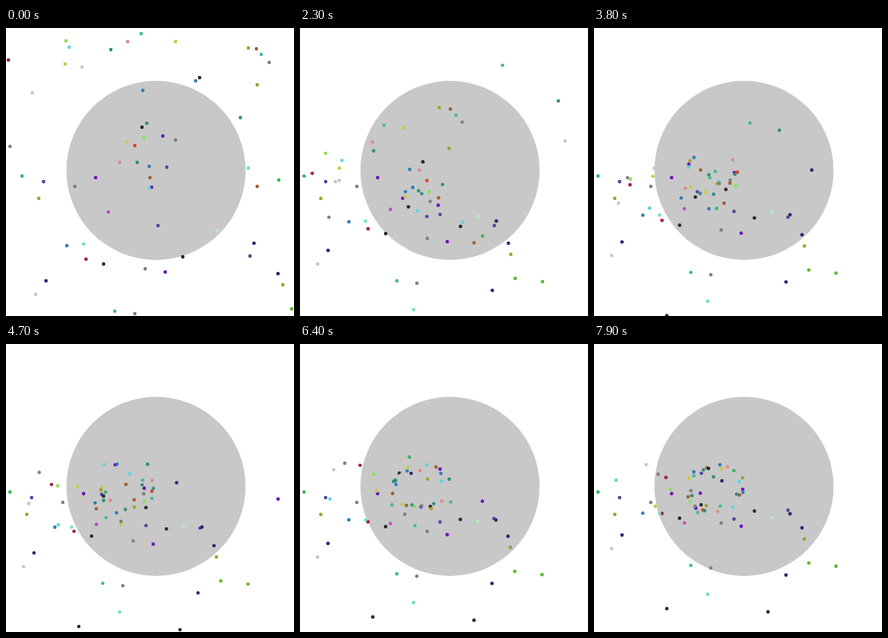
Write an HTML page that moves like this. It is 360x360 px and loops after 8000 ms.

```html
<!DOCTYPE html>
<html lang="en">
<head>
<meta charset="utf-8">
<title>Drifting dots</title>
<style>
  html, body { margin: 0; width: 100%; height: 100%; overflow: hidden; background: #fff; }
  svg { display: block; width: 100%; height: 100%; }
</style>
</head>
<body>
<svg id="stage" viewBox="0 0 360 360">
  <circle cx="187.5" cy="178" r="112" fill="#c8c8c8"/>
</svg>
<script>
const LOOP = 8000, TICK = 100, SPEED = 66;
const CENTER = { x: 150, y: 182 };

// Starting places by colour; dots beyond the stage drift in later.
const groups = {
  '#a91f3a': [[100, 289], [3, 40]],
  '#d2452f': [[161, 147]],
  '#a05f35': [[313, 26], [314, 198], [180, 187]],
  '#d98f88': [[152, 17], [142, 168]],
  '#c34bc4': [[128, 230]],
  '#6a16b8': [[196, 135], [182, 199], [112, 187], [199, 305], [650, 180]],
  '#4c46a8': [[47, 192], [190, 247], [201, 174], [305, 285]],
  '#2c2470': [[310, 269], [340, 307], [50, 316], [300, 366], [520, 150]],
  '#2a2530': [[242, 62], [170, 124], [122, 295], [221, 286], [106, 408], [255, 412]],
  '#2f7fb5': [[171, 78], [179, 173], [76, 272], [237, 66]],
  '#5fd5dc': [[303, 175], [79, 24], [179, 200]],
  '#2f8f80': [[176, 119], [164, 168], [131, 27], [293, 112], [470, 60]],
  '#45bd92': [[169, 7], [319, 33], [136, 354], [390, 0]],
  '#74e2bd': [[97, 270], [157, 390]],
  '#38b85c': [[20, 185], [341, 190]],
  '#62b52f': [[425, 355], [357, 351]],
  '#8fdf55': [[75, 16], [172, 137]],
  '#c9c944': [[151, 142], [74, 45], [212, 17]],
  '#a3a032': [[303, 25], [314, 71], [346, 321], [41, 213]],
  '#808080': [[329, 43], [5, 148], [86, 198], [174, 301], [161, 357], [212, 140]],
  '#c5c8c5': [[95, 49], [33, 81], [37, 333], [480, 110]],
  '#bce8b8': [[264, 253]]
};

const clamp = (v, lo, hi) => Math.min(hi, Math.max(lo, v));

// Low dots settle quickly, then creep upward.
function creep(x, y) {
  const lift = clamp((y - 225) / 60, 0, 1);
  return Array.from({ length: LOOP / TICK }, (_, i) => {
    const t = i * TICK / 1000, settle = 1 - Math.exp(-t / 0.45);
    return [
      x - (15 + Math.max(0, x - 210) * 0.5) * settle,
      y - lift * (22 * settle + 7 * t)
    ];
  });
}

// Other dots fly along a common flow, then steer into a loose swarm.
function swarm(x, y, index) {
  let vx = -0.17 * (x - 20) + 0.15 * (y - 80);
  let vy = 55 - 0.11 * x + 0.12 * y;
  const reach = Math.hypot(x - CENTER.x, y - CENTER.y);
  const scale = SPEED * Math.min(1, reach / 70) / Math.hypot(vx, vy);
  vx *= scale;
  vy *= scale;
  const homeX = x < 110 ? 62 : CENTER.x;
  const path = [], dt = 0.02;
  for (let step = 0; step < LOOP / 20; step++) {
    if (step % 5 === 0) path.push([x, y]);
    const t = step * dt;
    if (t > 0.9) {
      const angle = index * 2.4 + 0.5 * t;
      const dx = homeX + 28 * Math.cos(angle) - x;
      const dy = CENTER.y + 22 * Math.sin(angle) - y;
      const pull = Math.min(1.3, SPEED / Math.hypot(dx, dy));
      vx += (dx * pull - vx) * 0.8 * dt;
      vy += (dy * pull - vy) * 0.8 * dt;
    }
    x += vx * dt;
    y += vy * dt;
  }
  return path;
}

const stage = document.getElementById('stage');
const dots = [];
for (const [color, starts] of Object.entries(groups)) {
  for (const [x, y] of starts) {
    const node = document.createElementNS('http://www.w3.org/2000/svg', 'circle');
    node.setAttribute('r', 2.2);
    node.setAttribute('fill', color);
    stage.append(node);
    const low = y > 215 || (x < 115 && y > 180);
    dots.push({ node, path: low ? creep(x, y) : swarm(x, y, dots.length) });
  }
}

function render(ms) {
  const tick = Math.floor((ms % LOOP) / TICK);
  for (const { node, path } of dots) {
    node.setAttribute('cx', path[tick][0].toFixed(1));
    node.setAttribute('cy', path[tick][1].toFixed(1));
  }
}

const begin = performance.now();
function loop() {
  render(performance.now() - begin);
  requestAnimationFrame(loop);
}
loop();
</script>
</body>
</html>
```
